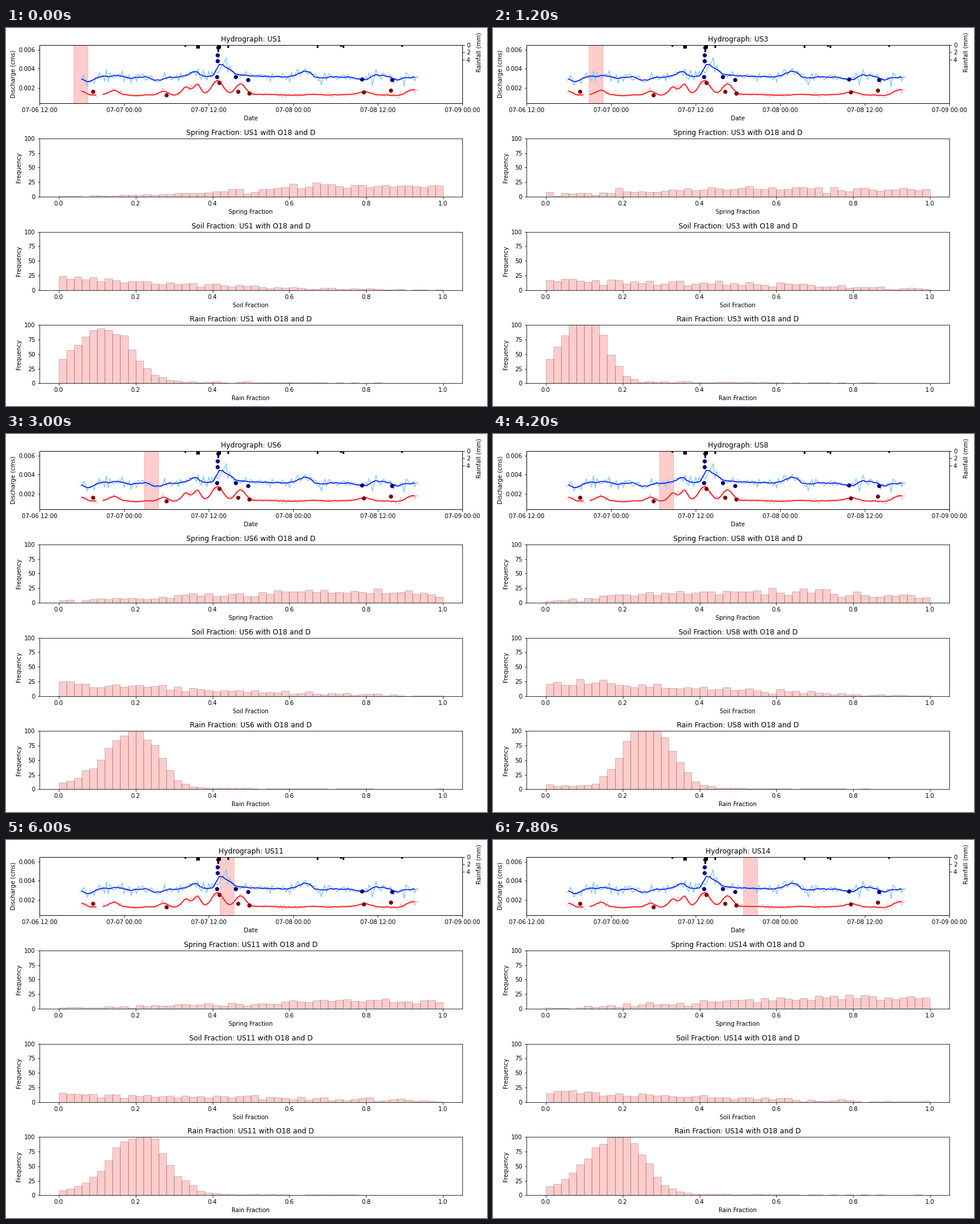
These frames come from a looping animation (819 px wide and 643 px high, 8000 ms). A matplotlib script:

```python
import numpy as np
import matplotlib.pyplot as plt
from matplotlib.animation import FuncAnimation

W, H, DPI = 819, 643, 72
FRAMES, STEP_MS, HOLD = 40, 200, 3
LEFT, TOP, PITCH, WIDTH, HEIGHT = 57, 29.1, 158.75, 720, 99.05
BINS = 50

# Bumps on a flat flow: (hour, height, width); discharge in 1e-5 cms.
UPPER_BUMPS = [(6.9, -42, .7), (11, 25, .9), (16.8, -30, .7), (22.1, 55, .6),
               (25.6, 125, .6), (27, 75, .9), (28.7, 25, .6), (37.9, 35, .7),
               (46, -24, .9), (47.7, 30, .5), (50.6, -32, .7)]
LOWER_BUMPS = [(6, 40, .5), (10.6, 45, .6), (17.6, 45, .6), (20.8, 82, .6),
               (22.4, 110, .5), (25.2, 155, .8), (28.5, 105, .7),
               (46.1, 30, .8), (53, 55, .9)]

UPPER_DOTS = [(25.17, 318), (25.25, 482), (25.25, 544), (25.33, 624),
              (27.83, 315), (29.6, 285), (45.75, 291), (50, 285)]
LOWER_DOTS = [(7.6, 161), (18, 124), (25.5, 253), (28.2, 161), (29.75, 143),
              (46, 155), (49.85, 173)]
RAIN = [(20.6, .45), (22.25, .9), (22.5, .9), (25.25, 1.9), (25.5, .9),
        (26.7, .8), (39.35, .8), (42.7, .45), (43, .8), (51.3, .45)]

# Sites between the key sites are blended. Each key holds the window start,
# spring bell (peak, centre, width), soil fall (start, power) and
# rain bell (peak, centre, left width, right width).
KEYS = {
    1: (4.85, 20, .8, .3, 22, 2, 90, .13, .09, .06),
    3: (8.8, 14, .65, .45, 17, .75, 118, .11, .065, .043),
    6: (14.85, 19, .7, .35, 22, 1.5, 106, .2, .075, .055),
    8: (18.85, 20, .57, .35, 24, 1.4, 130, .26, .053, .06),
    10: (24.7, 16, .57, .35, 18, .9, 130, .25, .062, .05),
    12: (26.45, 12, 1.1, .45, 5, .5, 76, .17, .085, .085),
    14: (30.75, 19, .78, .35, 18, 1.5, 102, .2, .085, .058),
}


def bell(x, peak, centre, left, right=None):
    width = np.where(x < centre, left, right or left)
    return peak * np.exp(-((x - centre) / width) ** 2 / 2)


def site_state(site):
    """Return the window start and the three histograms of one site."""
    start, *p = [np.interp(site, list(KEYS), col) for col in zip(*KEYS.values())]
    x = (np.arange(BINS) + .5) / BINS
    spring = bell(x, *p[:3])
    soil = p[3] * (1 - x) ** p[4] + 1
    rain = bell(x, *p[5:]) + 7 * np.exp(-x / .3)
    rng = np.random.default_rng(site)
    hists = [np.maximum(0, np.round(mean + rng.normal(0, noise, BINS) * np.sqrt(mean)))
             for mean, noise in ((spring, .7), (soil, .7), (rain, .4))]
    return start, hists


def panel(row):
    bottom = H - TOP - row * PITCH - HEIGHT
    return fig.add_axes([LEFT / W, bottom / H, WIDTH / W, HEIGHT / H])


def draw_flow(base, bumps, colors, seed, gap=None):
    t = np.arange(5.75, 53.8, .25)
    trend = base + sum(bell(t, height, hour, width) for hour, height, width in bumps)
    noise = np.random.default_rng(seed).normal(0, .1, t.size)
    raw = trend * (1 + noise)
    smooth = trend * (1 + np.convolve(noise, np.ones(9) / 9, "same"))
    smooth[(t < 6) | (t > 53.3)] = np.nan
    if gap:
        middle = sum(gap) / 2
        raw[abs(t - middle) < .3] = np.nan
        smooth[(t > gap[0]) & (t < gap[1])] = np.nan
    flow.plot(t, raw, color=colors[0])
    flow.plot(t, smooth, color=colors[1])


fig = plt.figure(figsize=(W / DPI, H / DPI), dpi=DPI, facecolor="white")

flow = panel(0)
flow.set(xlim=(0, 60), ylim=(36, 650), xlabel="Date", ylabel="Discharge (cms)")
flow.set_xticks(range(0, 61, 12), [f"07-0{6 + h // 24} {h % 24:02d}:00"
                                   for h in range(12, 73, 12)])
flow.set_yticks([200, 400, 600], ["0.002", "0.004", "0.006"])
span = flow.axvspan(0, 2, color="red", alpha=.2)
draw_flow(312, UPPER_BUMPS, ("lightskyblue", "blue"), 4)
draw_flow(125, LOWER_BUMPS, ("pink", "red"), 9, gap=(8.1, 9))
flow.plot(*zip(*UPPER_DOTS), "o", color="navy")
flow.plot(*zip(*LOWER_DOTS), "o", color="maroon")

rain_axis = flow.twinx()
rain_axis.bar(*zip(*RAIN), width=.25, align="edge", color="black")
rain_axis.set(xlim=(0, 60), ylim=(16, 0), yticks=[0, 2, 4])
rain_axis.set_ylabel("Rainfall (mm)", y=.88, labelpad=10.4)

panels = []
for row, name in enumerate(("Spring", "Soil", "Rain"), 1):
    ax = panel(row)
    bars = ax.bar(np.arange(BINS) / BINS, np.zeros(BINS), width=1 / BINS,
                  align="edge", facecolor="red", edgecolor="black",
                  linewidth=1, alpha=.2)
    ax.set(xlim=(-.05, 1.05), ylim=(0, 100), yticks=range(0, 101, 25),
           xlabel=f"{name} Fraction", ylabel="Frequency")
    panels.append((ax, bars, name))


def update(frame):
    site = 1 + frame // HOLD
    start, hists = site_state(site)
    flow.set_title(f"Hydrograph: US{site}")
    span.set_x(start)
    for (ax, bars, name), counts in zip(panels, hists):
        ax.set_title(f"{name} Fraction: US{site} with O18 and D")
        for bar, count in zip(bars, counts):
            bar.set_height(count)
    return []


anim = FuncAnimation(fig, update, frames=FRAMES, interval=STEP_MS,
                     repeat=True, repeat_delay=0, blit=False)
plt.show()
```
